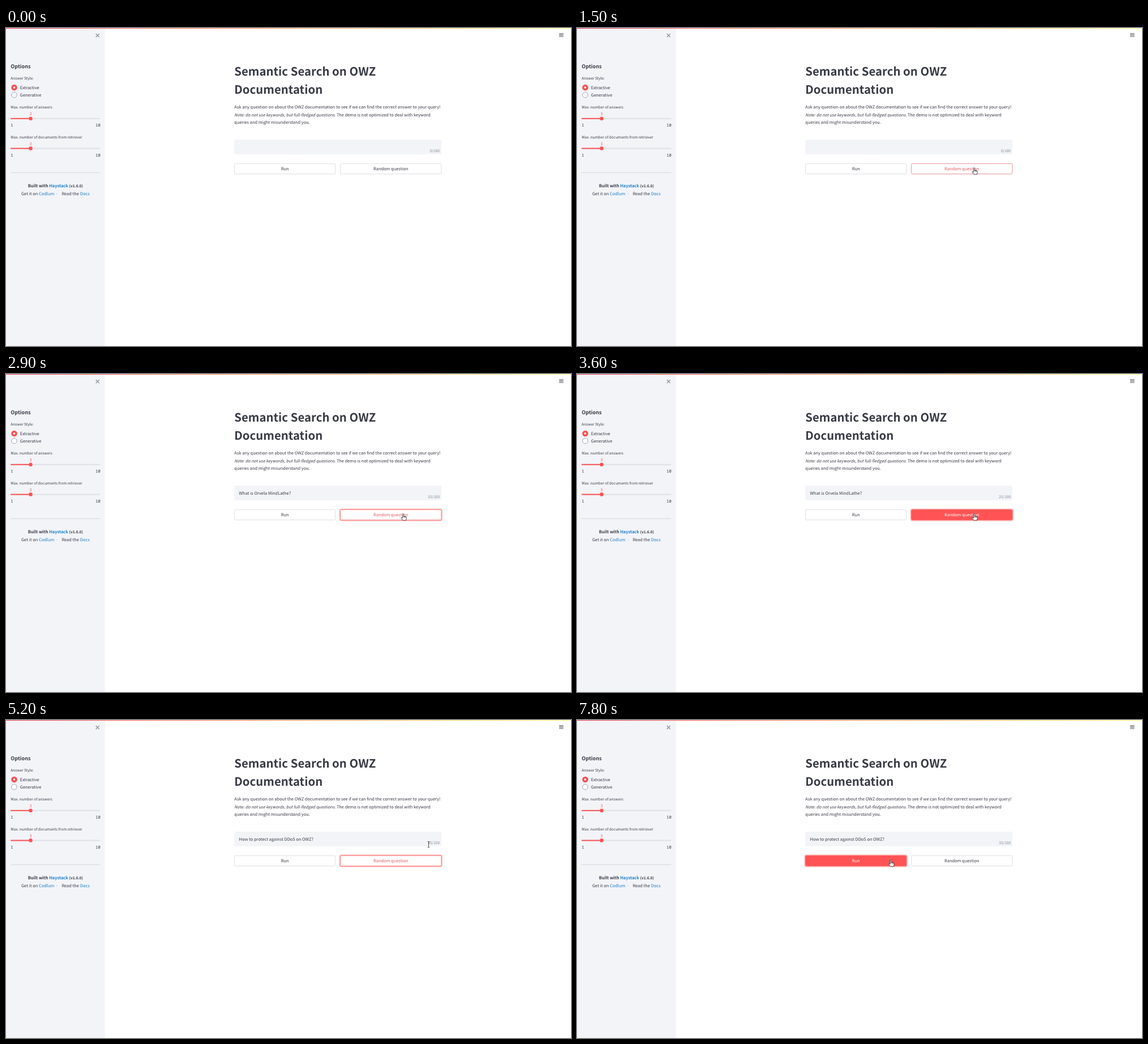
An HTML page for the animation above (8 s loop, 998 by 561 pixels).

```html
<!DOCTYPE html>
<html lang="en">
<head>
<meta charset="utf-8">
<title>Semantic search demo</title>
<style>
  html, body { margin: 0; width: 100%; height: 100%; overflow: hidden; background: #fff; }
  svg { display: block; width: 100%; height: 100%; }
  text {
    font: 7.45px "Noto Sans CJK JP", "Noto Sans CJK SC", "Noto Sans CJK", "Open Sans", sans-serif;
    fill: #393b46; text-rendering: geometricPrecision; white-space: pre;
  }
  .title { font-size: 20.4px; font-weight: 700; }
  .heading { font-size: 9.15px; font-weight: 700; }
  .small { font-size: 6.52px; }
  .bold { font-weight: 700; }
  .note { font-size: 7.15px; font-style: italic; }
  .link { fill: #1c7fc7; }
  .muted { fill: #858894; }
  .faint { fill: #b4b6be; }
  .mid { text-anchor: middle; }
  .end { text-anchor: end; }
  .mono { font: 7.28px "Noto Sans Mono", "DejaVu Sans Mono", monospace; }
  .value { fill: #f2636a; }
  .panel { fill: #f2f4f8; }
  .red { fill: #fb5355; }

  .button .box { fill: #fff; stroke: #d3d5da; stroke-width: .75; }
  .button .ring { fill: none; stroke: none; }
  .button text { text-anchor: middle; }
  .button.hover .box { stroke: #dc5a63; stroke-width: .65; }
  .button.hover text { fill: #dc5a63; }
  .button.focus .box { stroke: #fb4f51; stroke-width: .7; }
  .button.focus .ring { stroke: #ff4b4b; stroke-opacity: .42; stroke-width: 1.6; }
  .button.focus text { fill: #e8585f; }
  .button.active .box { fill: #ff5355; }
  .button.active text { fill: #fff; }

  .cursor { fill: #fff; stroke: #22232a; stroke-width: .8; stroke-linejoin: round; }
  .cursor .line { fill: none; }
</style>
</head>
<body>
<svg viewBox="0 0 998 561" preserveAspectRatio="none">
  <defs>
    <linearGradient id="rainbow">
      <stop stop-color="#e8495c"/>
      <stop offset=".5" stop-color="#ffa466"/>
      <stop offset="1" stop-color="#fffd80"/>
    </linearGradient>
    <g id="slider">
      <rect x="8" y="-1" width="158.5" height="2" rx="1" fill="#dfe1e6"/>
      <rect class="red" x="8" y="-1" width="35.5" height="2" rx="1"/>
      <circle class="red" cx="43.5" r="3.3"/>
      <text class="mono value mid" x="43.5" y="-5.7">3</text>
      <text class="mono" x="8.2" y="14.6">1</text>
      <text class="mono end" x="166.8" y="14.6">10</text>
    </g>
  </defs>

  <rect width="998" height="561" fill="#fff"/>

  <!-- Sidebar -->
  <rect class="panel" width="174.7" height="561"/>
  <path d="M158.7 10.2l6 6m0-6l-6 6" stroke="#a0a3ac" stroke-width="1.7"/>
  <text class="heading" x="8.3" y="70.6">Options</text>
  <text class="small" x="8.3" y="91">Answer Style:</text>
  <circle class="red" cx="14.5" cy="105" r="5.3"/>
  <circle cx="14.5" cy="105" r="1.8" fill="#fff"/>
  <text x="24.8" y="108">Extractive</text>
  <circle cx="14.5" cy="118" r="4.8" fill="#fff" stroke="#a0a2aa"/>
  <text x="24.8" y="121">Generative</text>
  <text class="small" x="8.3" y="142">Max. number of answers</text>
  <use href="#slider" y="159.8"/>
  <text class="small" x="8.3" y="194.8">Max. number of documents from retriever</text>
  <use href="#slider" y="212.4"/>
  <path d="M8 255.2H166.5" stroke="#d3d5db"/>
  <text class="bold mid" x="87.3" y="281.2">Built with <tspan class="link">Haystack</tspan> <tspan class="small">(v1.6.0)</tspan></text>
  <text x="27" y="294.6">Get it on</text>
  <text class="link" x="58" y="294.6">Codlum</text>
  <text class="muted mid" x="90.2" y="294.6">·</text>
  <text x="98.4" y="294.6">Read the</text>
  <text class="link" x="130.8" y="294.6">Docs</text>

  <!-- Header -->
  <rect width="998" height="1.1" fill="url(#rainbow)"/>
  <path d="M977 10.4h7.6m-7.6 2.3h7.6m-7.6 2.3h7.6" stroke="#50525c" stroke-width="1.1"/>
  <g id="running">
    <g fill="none" stroke="#8b8d96" stroke-width=".9">
      <circle cx="890" cy="14.5" r="2.9"/>
      <circle cx="897.2" cy="14.5" r="2.9"/>
      <path d="M893.6 15.6v-2.8l-2.2-1.8 3-2.2 1.6 2.2h2.4"/>
      <circle cx="895.8" cy="7.2" r=".9"/>
    </g>
    <text class="small faint" x="904.5" y="15">RUNNING...</text>
    <text class="small" x="949.5" y="15">Stop</text>
  </g>

  <!-- Main column -->
  <text class="title" x="403.2" y="83.7">Semantic Search on OWZ</text>
  <text class="title" x="403.2" y="115.9">Documentation</text>
  <text x="403.3" y="142.4">Ask any question on about the OWZ documentation to see if we can find the correct answer to your query!</text>
  <text x="403.3" y="155.6"><tspan class="note">Note: do not use keywords, but full-fledged questions.</tspan> The demo is not optimized to deal with keyword</text>
  <text x="403.3" y="168.8">queries and might misunderstand you.</text>
  <rect class="panel" x="403.2" y="197" width="366" height="25.7" rx="2"/>
  <text id="question" x="411.6" y="213"></text>
  <text id="count" class="small muted end" x="766" y="219.4"></text>

  <g id="run" class="button">
    <rect class="ring" x="402.4" y="238.2" width="180.5" height="20.4" rx="2.8"/>
    <rect class="box" x="403.5" y="239.3" width="178.3" height="18.2" rx="2"/>
    <text x="492.7" y="251.4">Run</text>
  </g>
  <g id="random" class="button">
    <rect class="ring" x="589.5" y="238.2" width="180.5" height="20.4" rx="2.8"/>
    <rect class="box" x="590.6" y="239.3" width="178.3" height="18.2" rx="2"/>
    <text x="679.8" y="251.4">Random question</text>
  </g>

  <!-- Each pointer has its hot spot at 0,0 -->
  <g id="arrow" class="cursor"><path d="M0 0V10.5l2.4-2.2 1.6 3.8 1.7-.7-1.6-3.7H7.4z"/></g>
  <g id="ibeam" class="cursor"><path class="line" d="M-1.8-5H-.4L0-4.6.4-5H1.8M0-4.6V4.6M-1.8 5H-.4L0 4.6.4 5H1.8"/></g>
  <g id="hand" class="cursor">
    <path d="M-1 .6Q0-.6 1 .6V4.4L5 5.4Q6 5.7 5.8 7L5 11.8H-.6L-3.7 7.6Q-3.5 6-2 7L-1 8z"/>
    <path class="line" d="M1 4.4V6.6M2.8 5V6.8M4.4 5.4V7"/>
  </g>
</svg>
<script>
  const LOOP = 8000, STEP = 100;
  const $ = id => document.getElementById(id);
  const within = (t, ...spans) => spans.some(([from, to]) => t >= from && t < to);

  // Pointer path: time, x, y
  const PATH = [
    [800, 917, 342], [1000, 805, 305], [1200, 735, 272], [1400, 706, 250],
    [1500, 701.5, 246.4], [5100, 701.5, 246.4], [5200, 746.5, 219.5], [5300, 742, 182],
    [5400, 725, 153], [5500, 703, 142], [5600, 678, 142], [5800, 617, 176],
    [6000, 569, 229], [6200, 558, 244], [6400, 554.3, 246.6]
  ];
  const QUESTIONS = [
    [0, ""],
    [2500, "What is Orvela MindLathe?"],
    [4100, "How to protect against DDoS on OWZ?"]
  ];

  function pointerAt(t) {
    const next = PATH.findIndex(p => p[0] > t);
    if (next < 0) return PATH[PATH.length - 1].slice(1);
    if (next === 0) return null;
    const [t0, x0, y0] = PATH[next - 1], [t1, x1, y1] = PATH[next];
    const k = (t - t0) / (t1 - t0);
    return [x0 + (x1 - x0) * k, y0 + (y1 - y0) * k];
  }

  function over(point, left, top, right, bottom) {
    return !!point && point[0] >= left && point[0] <= right && point[1] >= top && point[1] <= bottom;
  }

  function setButton(id, states) {
    for (const name in states) $(id).classList.toggle(name, states[name]);
  }

  function drawPointer(point, onButton) {
    const onText = over(point, 403, 133, 769, 173) || over(point, 403, 197, 769, 223);
    const shape = onButton ? "hand" : onText ? "ibeam" : "arrow";
    for (const id of ["arrow", "ibeam", "hand"]) {
      $(id).style.display = point && id === shape ? "" : "none";
      if (point) $(id).setAttribute("transform", `translate(${point})`);
    }
  }

  function draw(t) {
    const point = pointerAt(t);
    const onRun = over(point, 403, 239, 582, 258);
    const onRandom = over(point, 590, 239, 769, 258);
    setButton("run", { hover: onRun, focus: t >= 7800, active: t >= 7800 });
    setButton("random", {
      hover: onRandom,
      focus: within(t, [2000, 7800]),
      active: within(t, [2000, 2300], [3600, 3800])
    });
    drawPointer(point, onRun || onRandom);

    const question = QUESTIONS.filter(q => q[0] <= t).pop()[1];
    $("question").textContent = question;
    $("count").textContent = `${question.length}/100`;
    $("running").style.display = within(t, [2400, 2900], [4000, 4500]) ? "" : "none";
  }

  const start = performance.now();
  function tick() {
    const t = (performance.now() - start) % LOOP;
    draw(Math.floor(t / STEP) * STEP);
    requestAnimationFrame(tick);
  }
  tick();
</script>
</body>
</html>
```
